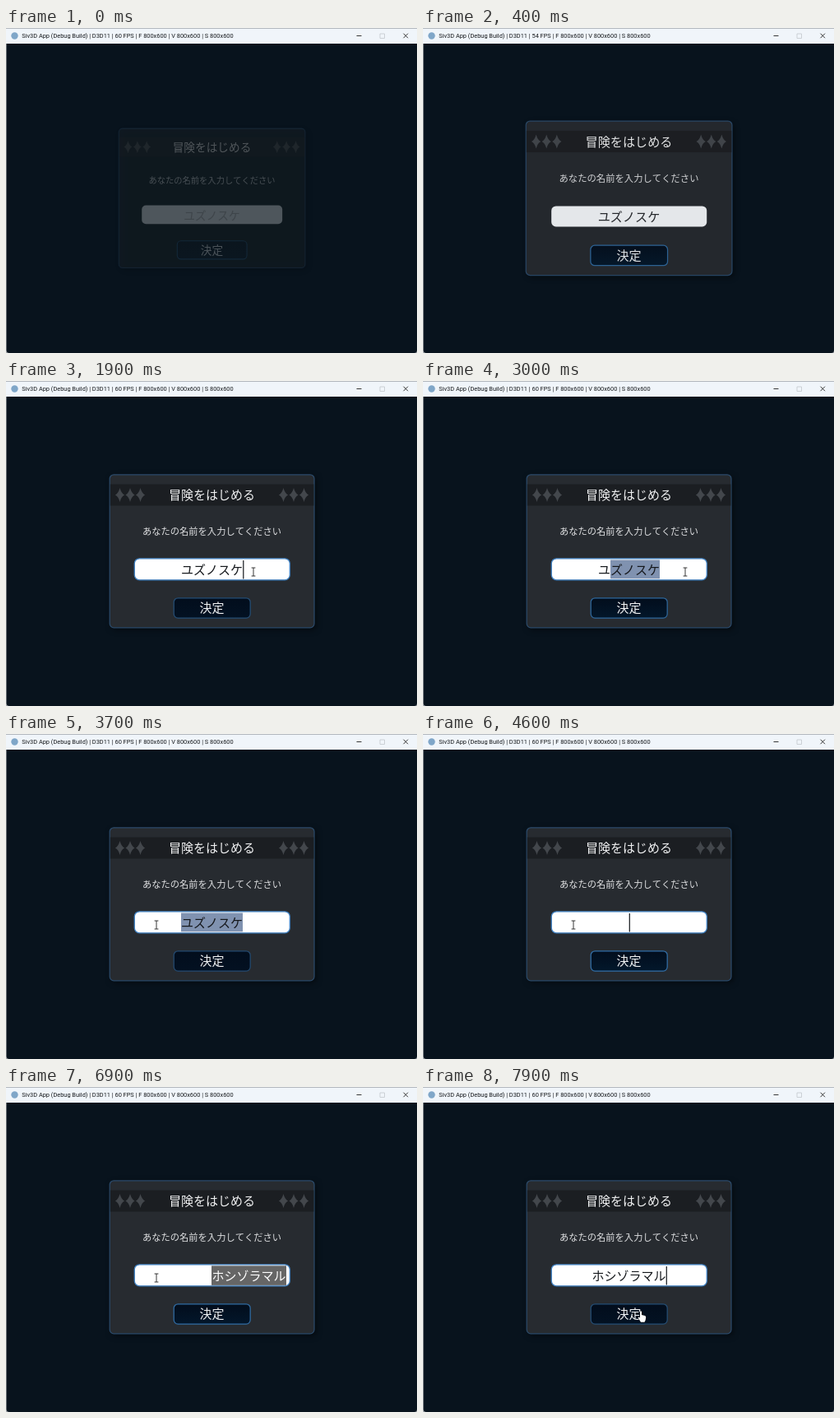
Animation, 500 px wide and 395 px high, one loop 8 s. Source, as an HTML page with a canvas:

```html
<!DOCTYPE html>
<html lang="ja">
<head>
<meta charset="utf-8">
<style>
html, body { margin: 0; width: 100%; height: 100%; overflow: hidden; background: #08131d; }
canvas { display: block; }
</style>
</head>
<body>
<canvas id="stage" width="500" height="395"></canvas>
<script>
const ctx = document.getElementById('stage').getContext('2d');
const LOOP = 8000, STEP = 100;
const CX = 250.5, CY = 207;
const JP = '"Noto Sans CJK JP", "Noto Sans CJK", "Noto Sans", sans-serif';
const OLD_NAME = 'ユズノスケ', NEW_NAME = 'ホシゾラマル';
const KANA = 'ほしぞらまる', KEYS = 'ｈｓｚｒｍｒ';
const CHAR = 15;

// time, x, y
const POINTER = [
  [800, 478, 262], [1000, 335, 236], [1500, 301, 232], [2200, 301, 232],
  [2700, 346, 232], [2800, 346, 232], [3000, 319, 232], [3700, 183, 232],
  [7200, 183, 232], [7500, 250, 276], [7800, 267, 279], [8000, 267, 279]
];

function pointerAt(t) {
  if (t < POINTER[0][0]) return null;
  const i = POINTER.findIndex(k => k[0] > t);
  const [t0, x0, y0] = POINTER[i - 1], [t1, x1, y1] = POINTER[i];
  const p = (t - t0) / (t1 - t0), e = p * p * (3 - 2 * p);
  return [x0 + (x1 - x0) * e, y0 + (y1 - y0) * e];
}

function rect(x, y, w, h, color) {
  ctx.fillStyle = color;
  ctx.fillRect(x, y, w, h);
}

function panel(x, y, w, h, r, fill, stroke, line = 1.25) {
  ctx.beginPath();
  ctx.roundRect(x, y, w, h, r);
  ctx.fillStyle = fill;
  ctx.fill();
  if (!stroke) return;
  ctx.shadowColor = 'transparent';
  ctx.strokeStyle = stroke;
  ctx.lineWidth = line;
  ctx.stroke();
}

function polyline(points, color, width, close = false) {
  ctx.beginPath();
  points.forEach(([x, y]) => ctx.lineTo(x, y));
  if (close) ctx.closePath();
  ctx.strokeStyle = color;
  ctx.lineWidth = width;
  ctx.stroke();
}

function text(str, x, y, size, color, align = 'center') {
  ctx.font = `${size}px ${JP}`;
  ctx.textAlign = align;
  ctx.fillStyle = color;
  ctx.fillText(str, x, y + size * 0.38);
}

function diamond(x, y) {
  const w = 5.6, h = 8.4, k = 1.8;
  ctx.beginPath();
  ctx.moveTo(x, y - h);
  ctx.quadraticCurveTo(x + k, y - k, x + w, y);
  ctx.quadraticCurveTo(x + k, y + k, x, y + h);
  ctx.quadraticCurveTo(x - k, y + k, x - w, y);
  ctx.quadraticCurveTo(x - k, y - k, x, y - h);
  ctx.fillStyle = '#43474c';
  ctx.fill();
}

function drawWindow(t) {
  rect(0, 0, 500, 395, '#a4a8ac');
  panel(0.6, 10, 499.4, 385, [0, 0, 3.5, 3.5], '#08131d');
  rect(0, 0, 500, 19, '#f0f5fa');
  rect(0, 0, 500, 0.6, '#8b9096');
  ctx.beginPath();
  ctx.arc(10.5, 9.5, 4.2, 0, 7);
  ctx.fillStyle = '#7fa6c8';
  ctx.fill();
  const fps = t >= 300 && t < 1300 ? 54 : 60;
  ctx.font = '7.4px Roboto, sans-serif';
  ctx.textAlign = 'left';
  ctx.fillStyle = '#15181b';
  ctx.fillText(`Siv3D App (Debug Build) | D3D11 | ${fps} FPS | F 800x600 | V 800x600 | S 800x600`, 19.3, 12.4);
  polyline([[426.5, 9.5], [432.5, 9.5]], '#222', 0.9);
  polyline([[455, 7], [460.5, 7], [460.5, 12.5], [455, 12.5]], '#c3c8cd', 0.8, true);
  polyline([[483.5, 6.7], [489, 12.2]], '#222', 0.9);
  polyline([[489, 6.7], [483.5, 12.2]], '#222', 0.9);
}

function composition(t) {
  if (t >= 6500) return NEW_NAME;
  const n = Math.floor((t - 4800) / 130) + 1;
  const done = Math.min(n >> 1, KANA.length);
  return KANA.slice(0, done) + (n % 2 && done < KANA.length ? KEYS[done] : '');
}

function drawInput(t) {
  const active = t >= 1200;
  if (active) panel(156.3, 215.8, 189, 26, 6, '#fff', '#4183c4', 1.3);
  else panel(156.9, 216.4, 187.6, 24.8, 5.5, '#f3f6f9');

  if (t >= 4800 && t < 7100) {
    const str = composition(t);
    rect(250, 217.3, str.length * CHAR + 1, 23.6, '#666');
    text(str, 250.6, 229.5, CHAR, '#fff', 'left');
    return;
  }

  const name = t < 3900 ? OLD_NAME : t < 7100 ? '' : NEW_NAME;
  const end = CX + name.length * CHAR / 2;
  const picked = t < 2800 || t >= 3900 ? 0
    : Math.min(OLD_NAME.length, t < 3000 ? (t - 2700) / 100 : 4 + (t - 3000) / 100);
  if (picked) rect(end - picked * CHAR, 217.5, picked * CHAR, 22.8, '#8092b0');
  text(name, CX, 229.5, CHAR, '#15181c');
  if (active && !picked && t % 1000 >= 500) rect(end + 0.2, 218, 1.2, 22.5, '#15181c');
}

function drawDialog(t) {
  const u = Math.min(0.06 + t / 580, 1) - 1;
  const scale = 0.88 + 0.12 * (1 + 2.7 * u ** 3 + 1.7 * u ** 2);
  const alpha = Math.min(0.28 + 0.65 * t / 400, 1);
  const glow = 0.5 + 0.5 * Math.cos((t - 700) / 1000 * Math.PI);

  ctx.save();
  ctx.translate(CX, CY);
  ctx.scale(scale, scale);
  ctx.translate(-CX, -CY);
  ctx.globalAlpha = alpha;

  ctx.shadowColor = 'rgba(0,0,0,.5)';
  ctx.shadowBlur = 7;
  ctx.shadowOffsetX = ctx.shadowOffsetY = 2.5;
  panel(126.2, 113.8, 248.8, 186, 5, '#272b30', '#2b4a6a');
  ctx.shadowBlur = ctx.shadowOffsetX = ctx.shadowOffsetY = 0;

  rect(126.8, 125.5, 247.6, 26, '#1b1e22');
  for (const d of [87, 99.5, 112]) {
    diamond(CX - d, 138.5);
    diamond(CX + d, 138.5);
  }
  drawInput(t);

  const fill = ctx.createLinearGradient(0, 263, 0, 289);
  fill.addColorStop(0, '#020d1c');
  fill.addColorStop(1, `rgb(3,${17 + 7 * glow},${34 + 10 * glow})`);
  panel(204.2, 263.8, 93, 24.3, 5, fill, `rgb(${36 + 14 * glow},${74 + 38 * glow},${112 + 56 * glow})`);

  text('冒険をはじめる', CX, 138.5, 15, '#f0f1f2');
  text('あなたの名前を入力してください', CX, 182.5, 11.25, '#dfe0e2');
  text('決定', CX, 275.5, 15, '#f0f1f2');
  ctx.restore();
}

function drawBeam(x, y) {
  const line = (a, b) => polyline([a, b], '#222', 0.9);
  line([x, y - 5], [x, y + 5]);
  line([x - 2.4, y - 5], [x + 2.4, y - 5]);
  line([x - 2.4, y + 5], [x + 2.4, y + 5]);
}

function drawShape(x, y, path) {
  ctx.save();
  ctx.translate(x, y);
  const shape = new Path2D(path);
  ctx.lineWidth = 0.9;
  ctx.lineJoin = 'round';
  ctx.strokeStyle = '#111';
  ctx.stroke(shape);
  ctx.fillStyle = '#fff';
  ctx.fill(shape);
  ctx.restore();
}

function drawPointer(t) {
  const pos = pointerAt(t);
  if (!pos) return;
  const [x, y] = pos;
  const over = (l, top, r, b) => x > l && x < r && y > top && y < b;
  if (over(156, 215, 346, 242)) drawBeam(x, y);
  else if (over(204, 263, 298, 288))
    drawShape(x, y, 'M-3-6Q-2-7.5-1-6V-2L3-1Q4.3-.6 4.2 1L3.6 4.5 2.5 6.8H-2L-5 2Q-5.8 .6-4.5 .4L-3 1.5Z');
  else drawShape(x, y, 'M0 0V10L2.4 7.8 4 11.3 5.5 10.6 4 7.3H7Z');
}

function frame(now) {
  const t = Math.floor(now % LOOP / STEP) * STEP;
  drawWindow(t);
  drawDialog(t);
  drawPointer(t);
  requestAnimationFrame(frame);
}

frame(0);
</script>
</body>
</html>
```
